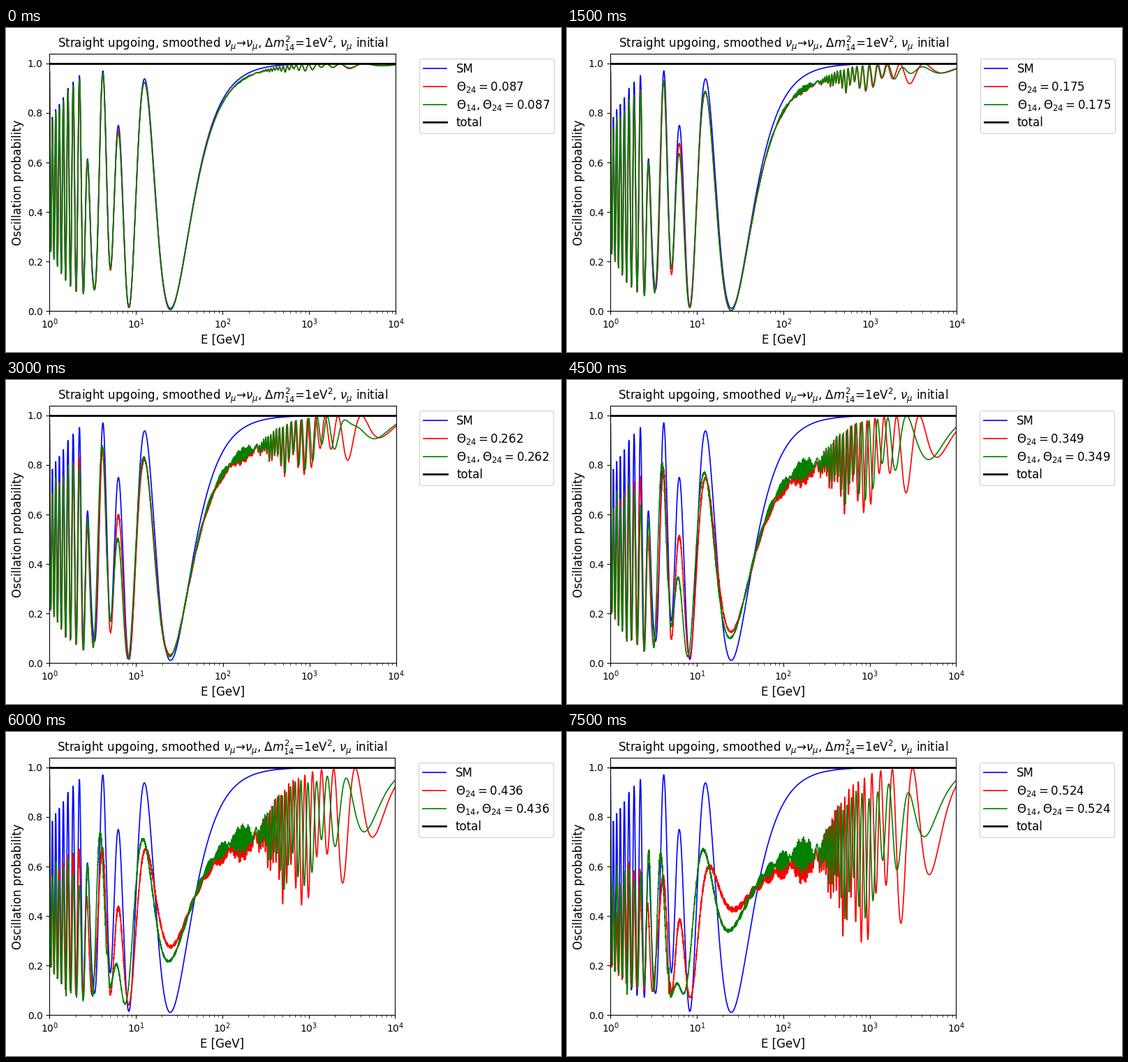
A matplotlib script that plays this animation: 795 px wide and 465 px high, repeating every 8000 ms.

```python
import numpy as np
import matplotlib.pyplot as plt
from matplotlib.animation import FuncAnimation

W, H, DPI = 795, 465, 100
STEP_MS, LOOP_MS, HOLD_MS = 500, 8000, 1500
ANGLES = np.radians([5, 10, 15, 20, 25, 30])

# Axes box in pixels; its width varies a little with each picture
LEFT, BOTTOM, HEIGHT = 62.3, 58.7, 369.6
WIDTHS = [496, 496, 496.4, 495.1, 495.1, 495.1]

# Neutrino mixing: angles in rad, mass splittings in eV^2
TH12, TH13, TH23 = 0.583996, 0.148190, 0.737324
MASS2 = np.array([0, 7.5e-5, 2.55e-3, 1.0])

# Earth from the surface to the centre: (km, g/cm^3, electron fraction)
LAYERS = [
    (670.0, 3.57, 0.4957),
    (1111.0, 4.71, 0.4957),
    (1110.0, 5.29, 0.4957),
    (1130.0, 10.71, 0.4656),
    (1128.5, 11.82, 0.4656),
    (1221.5, 12.98, 0.4656),
]
KM_GEV = 5.0677       # km * eV^2 / GeV as a phase
POTENTIAL = 3.868e-4  # charged current potential per km and g/cm^3

ENERGY = np.logspace(0, 4, 10000)
HALF_WINDOW = 25


def rotation(i, j, angle):
    r = np.eye(4)
    r[i, i] = r[j, j] = np.cos(angle)
    r[i, j] = np.sin(angle)
    r[j, i] = -np.sin(angle)
    return r


def survival(th14, th24):
    """Muon neutrino survival straight through the Earth."""
    u = (rotation(1, 3, th24) @ rotation(0, 3, th14) @ rotation(1, 2, TH23)
         @ rotation(0, 2, TH13) @ rotation(0, 1, TH12))
    vacuum = (u * MASS2) @ u.T * (KM_GEV / 2) / ENERGY[:, None, None]
    state = np.zeros((len(ENERGY), 4, 1), complex)
    state[:, 1] = 1
    for km, rho, ye in LAYERS:
        charged = POTENTIAL * rho * ye
        neutral = -POTENTIAL / 2 * rho * (1 - ye)
        matter = np.diag([charged + neutral, neutral, neutral, 0])
        level, q = np.linalg.eigh(vacuum + matter)
        state = q.transpose(0, 2, 1) @ state
        state = q @ (np.exp(-1j * km * level)[..., None] * state)
    # The path is symmetric, so the second half is the transpose of the first.
    return np.abs((state ** 2).sum(axis=(1, 2))) ** 2


def smooth(y):
    """Running mean whose window shrinks at both ends."""
    n = len(y)
    i = np.arange(n)
    half = np.minimum(HALF_WINDOW, np.minimum(i, n - 1 - i))
    total = np.concatenate([[0], np.cumsum(y)])
    return (total[i + half + 1] - total[i - half]) / (2 * half + 1)


def axes_box(width):
    return [LEFT / W, BOTTOM / H, width / W, HEIGHT / H]


standard = smooth(survival(0, 0))
one_angle = [smooth(survival(0, a)) for a in ANGLES]
two_angles = [smooth(survival(a, a)) for a in ANGLES]

fig = plt.figure(figsize=(W / DPI, H / DPI), dpi=DPI, facecolor="white")
ax = fig.add_axes(axes_box(WIDTHS[0]))
ax.set_xscale("log")
ax.set_xlim(1, 1e4)
ax.set_ylim(0, 1.04)
ax.tick_params(axis="x", pad=2.8)
ax.set_xlabel("E [GeV]", fontsize=12, labelpad=3.7)
ax.set_ylabel("Oscillation probability", fontsize=12, labelpad=3.3)
ax.set_title(r"Straight upgoing, smoothed $\nu_{\mu}$→$\nu_{\mu}$, "
             r"$\Delta m^2_{14}$=1eV$^2$, $\nu_{\mu}$ initial",
             fontsize=12, pad=6.4)

ax.plot(ENERGY, standard, color="blue", lw=1.2, label="SM")
red, = ax.plot(ENERGY, one_angle[0], color="red", lw=1.2, label="one")
green, = ax.plot(ENERGY, two_angles[0], color="green", lw=1.2, label="two")
ax.plot([1, 1e4], [1, 1], color="black", lw=2, label="total")
legend = ax.legend(bbox_to_anchor=(1.051, 1.002), loc="upper left",
                   fontsize=12, labelspacing=0.375, borderpad=0.36)
red_text, green_text = legend.get_texts()[1:3]


def draw(i):
    k = i * STEP_MS // HOLD_MS
    ax.set_position(axes_box(WIDTHS[k]))
    red.set_ydata(one_angle[k])
    green.set_ydata(two_angles[k])
    red_text.set_text(rf"$\Theta_{{24}}={ANGLES[k]:.3f}$")
    green_text.set_text(rf"$\Theta_{{14}}, \Theta_{{24}}={ANGLES[k]:.3f}$")
    return red, green, red_text, green_text


anim = FuncAnimation(fig, draw, frames=LOOP_MS // STEP_MS, interval=STEP_MS,
                     init_func=lambda: draw(0), repeat=True, repeat_delay=0)
plt.show()
```
